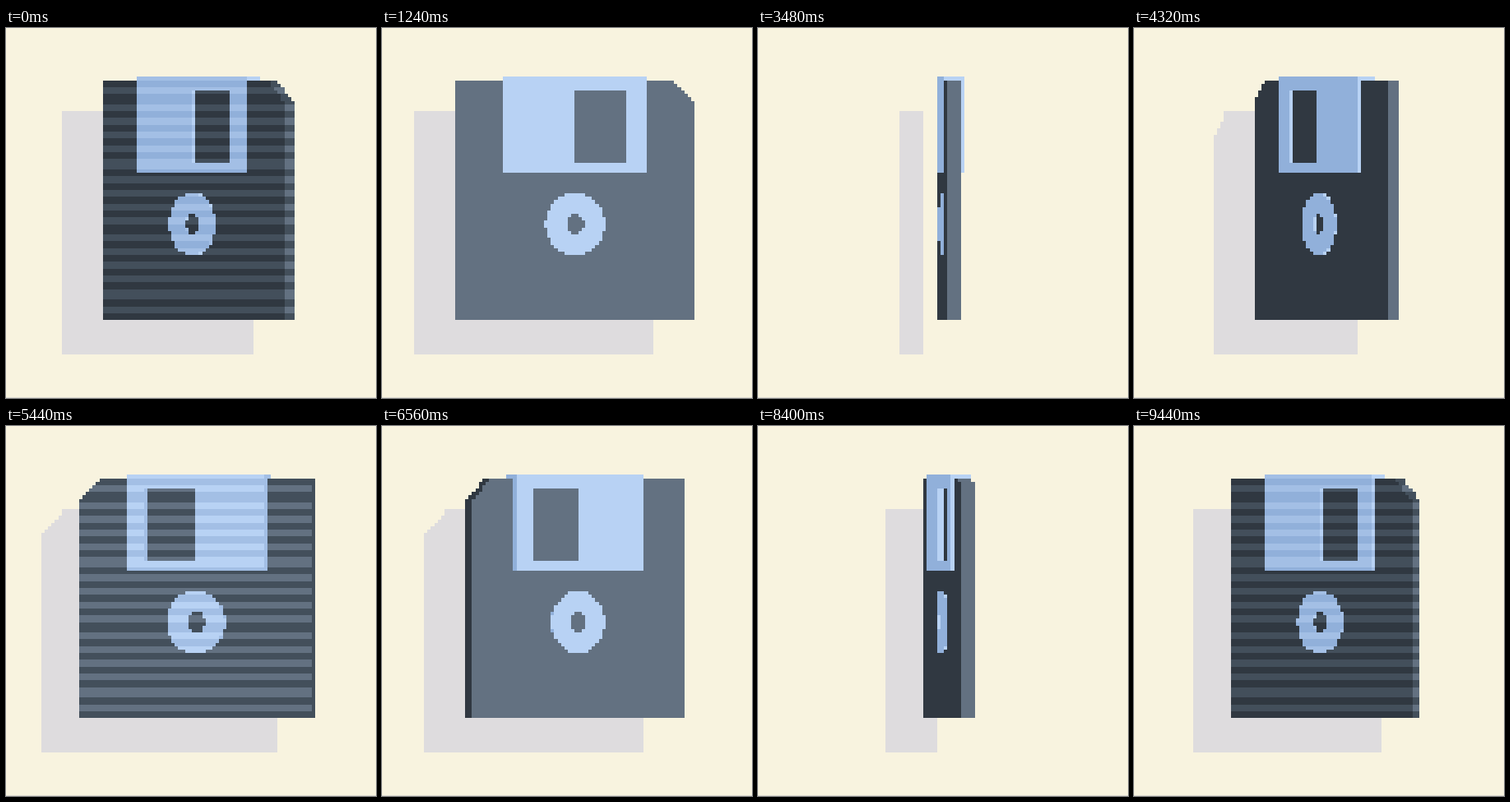
An HTML page with a canvas that plays this animation: 450x450 px, repeating every 9.48 s.

```html
<!DOCTYPE html>
<html lang="en">
<head>
<meta charset="utf-8">
<title>Spinning floppy disk</title>
<style>
  html, body { margin: 0; width: 100%; height: 100%; overflow: hidden; background: #f8f3df; }
  canvas { position: absolute; left: 0.8px; top: 0.8px; width: 450px; height: 450px; image-rendering: pixelated; }
  hr { position: absolute; left: 0; top: 449px; width: 450px; height: 1px; margin: 0; border: 0; background: #dedbd2; }
</style>
</head>
<body>
<canvas id="stage" width="108" height="108"></canvas>
<hr>
<script>
const ctx = document.getElementById('stage').getContext('2d');
const LOOP = 9480, STEP = 40, START_ANGLE = -40.65, LIGHT_ANGLE = 23;
const TOP = 15, SIZE = 70, HALF = SIZE / 2;
const BODY_Z = 2;
const SLIDER = { base: 2.45, front: 2.97, floor: 1.7 };
const HUB = { base: 2.3, front: 2.6, floor: 2 };
const PLASTIC = ['#303841', '#434f5b', '#637181'];
const METAL = ['#91b0da', '#a3bfe5', '#b8d2f4'];
const SHADOW = '#dedcde';
const rad = deg => deg * Math.PI / 180;

let tilt, cos, sin, flipped;

const snap = x => Math.round(55.78 + x);

// Blocks are made of voxels, each drawn one whole cell wide however it turns.
const leftOf = (x, z) => (x + 0.5) * cos - 0.5 + z * sin;
const rightOf = (x, z) => (x - 0.5) * cos + 0.5 + z * sin;

// Five light levels: odd ones alternate two shades in horizontal bands.
function shade(colors, normal, row) {
  const lit = 4.3 * Math.cos(rad(normal - LIGHT_ANGLE));
  const level = Math.max(0, Math.min(4, Math.floor(lit)));
  const band = Math.floor((row - TOP + 0.28) * 9 / 19) & 1;
  return colors[(level >> 1) + (level & 1 ? band : 0)];
}

const sideNormal = () => tilt > 0 ? tilt - 90 : tilt + 90;

function span(row, a, b, color) {
  if (b <= a) return;
  ctx.fillStyle = color;
  ctx.fillRect(a, row, b - a, 1);
}

// One row of a box reaching from depth z0 to its front at z1.
function slab(row, l, r, z0, z1, colors) {
  const a = snap(leftOf(l, z1)), b = snap(rightOf(r, z1));
  const side = shade(colors, sideNormal(), row);
  if (tilt > 0) span(row, snap(leftOf(l, z0)), a, side);
  else span(row, b, snap(rightOf(r, z0)), side);
  span(row, a, b, shade(colors, tilt, row));
}

// One row of a hole in the metal, with its visible inner wall.
function hole(row, l, r, { front, floor }) {
  const shift = Math.sign(tilt) * 0.5 * (1 - cos);
  const edge = (x, z) => snap(x * cos + z * sin + shift);
  const a = edge(l, front), b = edge(r, front);
  span(row, a, b, shade(METAL, sideNormal(), row));
  span(row, Math.max(a, edge(l, floor)), Math.min(b, edge(r, floor)), shade(PLASTIC, tilt, row));
}

const mirror = (l, r) => flipped ? [-r, -l] : [l, r];
const bodyEdges = i => mirror(-HALF, Math.min(HALF, 29 + Math.max(0, i)));
const chord = (radius, row) => Math.sqrt(Math.max(0, radius * radius - (row + 0.5 - 57) ** 2));

function metalParts(fromBack) {
  const base = part => fromBack ? -part.front : part.base;
  for (let row = TOP; row < 42; row++) slab(row, -21, 21, base(SLIDER), SLIDER.front, METAL);
  for (let row = 48; row < 66; row++) {
    const w = 0.967 * chord(9, row);
    slab(row, -w, w, base(HUB), HUB.front, METAL);
  }
}

function draw(time) {
  const angle = (START_ANGLE + time / LOOP * 360 + 450) % 360 - 90;
  flipped = angle >= 90;
  tilt = flipped ? angle - 180 : angle;
  cos = Math.cos(rad(tilt));
  sin = Math.sin(rad(tilt));
  ctx.clearRect(0, 0, 108, 108);

  const depth = BODY_Z * Math.abs(sin);
  for (let i = -1; i < SIZE; i++) {
    const [l, r] = bodyEdges(i);
    span(TOP + 10 + i, Math.round(44.22 + leftOf(l, 0) - depth),
      Math.round(44.22 + rightOf(r, 0) + depth), SHADOW);
  }

  metalParts(true);
  for (let i = 0; i < SIZE; i++) slab(TOP + i, ...bodyEdges(i), -BODY_Z, BODY_Z, PLASTIC);
  slab(TOP - 1, -21, 21, -SLIDER.front, SLIDER.front, METAL);
  metalParts(false);

  for (let row = 18; row < 39; row++) hole(row, ...mirror(0, 15), SLIDER);
  for (let row = 54; row < 60; row++) {
    const w = 0.85 * chord(3, row);
    hole(row, -w, w, HUB);
  }
}

const start = performance.now();
function tick() {
  const time = (performance.now() - start) % LOOP;
  draw(Math.floor(time / STEP + 0.01) * STEP);
  requestAnimationFrame(tick);
}
tick();
</script>
</body>
</html>
```
